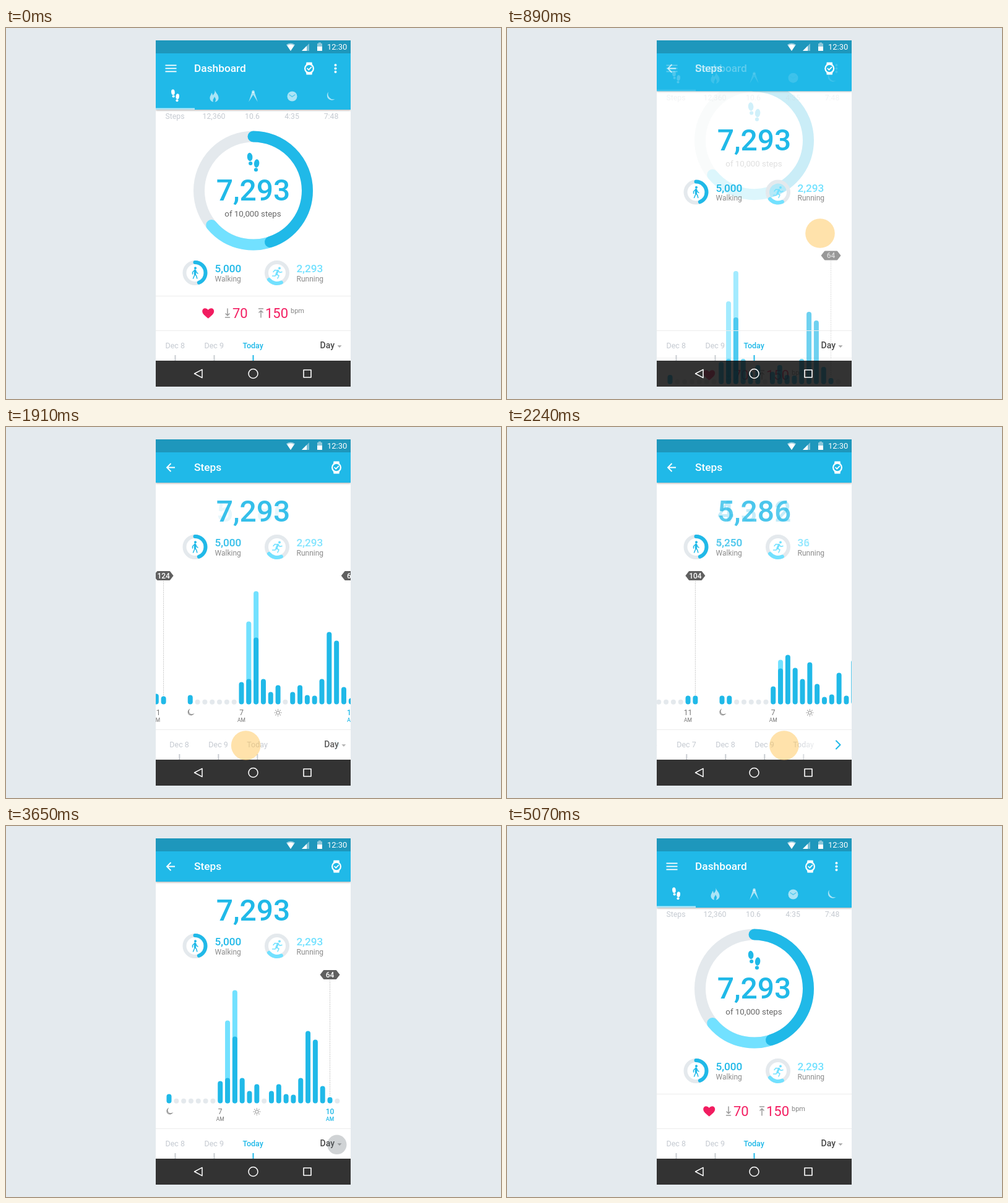
These frames come from a looping animation (800 by 600 pixels, 5600 ms). An HTML page with a canvas:

```html
<!DOCTYPE html>
<html lang="en">
<head>
<meta charset="utf-8">
<title>Step tracker</title>
<style>
html, body { margin: 0; width: 100%; height: 100%; overflow: hidden; background: #e4eaee; }
canvas { display: block; }
</style>
</head>
<body>
<canvas id="stage" width="800" height="600"></canvas>
<script>
const c = document.getElementById('stage').getContext('2d');
const LOOP = 5600, CYAN = '#20b9e8', LIGHT = '#72e1ff', GRAY = '#e4e9ed', PINK = '#f31d61', PALE = '#c5cad1';
const LEFT = 242, WIDTH = 315, MID = 399.5, STEP = 11.82, BASE = 448.5;

// Hourly bar heights; a pair is [walking, total].
const days = [
  { label: 'Today', total: '7,293', walk: '5,000', run: '2,293', last: 22, tag: '64', hour: '10', hourAt: 22,
    bars: [15, 0, 0, 0, 0, 0, 0, 36, [41, 134], [108, 183], 41, 20, 31, 0, 20, 31, 15, 14, 41, 117, 103, 28, 10, 0] },
  { label: 'Dec 9', total: '5,286', walk: '5,250', run: '36', last: 23, tag: '124', hour: '11', hourAt: 22,
    bars: [14, 14, 0, 0, 0, 0, 0, 29, [58, 72], 80, 59, 41, 68, 33, 12, 16, 51, 14, 72, 45, 30, 24, 17, 13] },
  { label: 'Dec 8', total: '4,382', walk: '4,350', run: '32', last: 23, tag: '104', hour: '11', hourAt: 22,
    bars: [14, 0, 0, 0, 0, 0, 0, 24, 52, [66, 78], 43, 28, 36, 60, 31, 14, 47, 20, 0, 0, 0, 0, 14, 14] }
];
const dates = ['Today', 'Dec 9', 'Dec 8', 'Dec 7', 'Dec 6', 'Dec 5', 'Dec 4'];

const clamp = v => Math.max(0, Math.min(1, v));
const seg = (t, a, b) => clamp((t - a) / (b - a));
const mix = (a, b, k) => a + (b - a) * k;

function fade(alpha, draw) {
  if (alpha <= 0) return;
  c.save();
  c.globalAlpha *= Math.min(1, alpha);
  draw();
  c.restore();
}
function at(x, y, scale, draw) {
  c.save();
  c.translate(x, y);
  c.scale(scale, scale);
  draw();
  c.restore();
}
function text(s, x, y, size, color, weight = 400, align = 'left') {
  c.font = `${weight} ${size}px Roboto, sans-serif`;
  c.textAlign = align;
  c.fillStyle = color;
  c.fillText(s, x, y);
}
function rect(x, y, w, h, color) {
  c.fillStyle = color;
  c.fillRect(x, y, w, h);
}
function ellipse(x, y, rx, ry, color, turn = 0) {
  c.beginPath();
  c.ellipse(x, y, rx, ry, turn, 0, 7);
  c.fillStyle = color;
  c.fill();
}
const disc = (x, y, r, color) => ellipse(x, y, r, r, color);
function stroke(d, color, width) {
  c.strokeStyle = color;
  c.lineWidth = width;
  c.stroke(new Path2D(d));
}
function fill(d, color) {
  c.fillStyle = color;
  c.fill(new Path2D(d));
}
// Angles in degrees, clockwise from the top.
function arc(x, y, r, from, to, width, color) {
  c.beginPath();
  c.arc(x, y, r, (from - 90) * Math.PI / 180, (to - 90) * Math.PI / 180);
  c.lineWidth = width;
  c.strokeStyle = color;
  c.stroke();
}

function feet(x, y, scale, color) {
  at(x, y, scale, () => {
    ellipse(-5.4, -8.5, 4.3, 6.8, color, -.1);
    ellipse(-4.3, 1.9, 3.1, 3, color);
    ellipse(5.6, 2, 4.2, 6.8, color, .1);
    ellipse(4.5, 12.2, 3.1, 3, color);
  });
}
function walker() {
  disc(.5, -7.8, 2, CYAN);
  stroke('M0-4L0 2', CYAN, 3.4);
  stroke('M0 2L-3 9M0 2L2.3 5L3.3 9M-1-4L-4-1V2M1-4L2.5-.8L4.5 1', CYAN, 1.5);
}
function runner() {
  disc(4, -7.5, 2, LIGHT);
  stroke('M1.5-3.5L-1 2', LIGHT, 3.2);
  stroke('M-1 2L-3 5H-7.5M-1 2L3 4.5L1 9M1.5-4L-3.5-4.5L-6-1.5M2-3.5L4.5-.5L8-1.5', LIGHT, 1.5);
}
function watch(x) {
  at(x, 65.5, 1, () => {
    fill('M-4.5-10H4.5L5.2-5H-5.2ZM-4.5 10H4.5L5.2 5H-5.2Z', '#fff');
    disc(0, 0, 8, '#fff');
    disc(0, 0, 5.8, CYAN);
    stroke('M-3 0L-.8 2.2L3.4-2.2', '#fff', 1.7);
  });
}
function moon(x, y, scale, draw) {
  at(x, y, scale, () => draw('M-3-7A7 7 0 1 0 7 4A8 8 0 0 1-3-7Z'));
}

function ring(dy, alpha) {
  fade(alpha, () => {
    const y = 263 + dy;
    arc(MID, y, 87.5, 0, 360, 18, GRAY);
    arc(MID, y, 87.5, 150, 230.3, 18, LIGHT);
    arc(MID, y, 87.5, 0, 161.7, 18, CYAN);
    feet(399.5, 217 + dy, 1, CYAN);
    text('of 10,000 steps', 399, 305 + dy, 13.3, '#666', 400, 'center');
  });
}

function summary(numberY, rowY, q) {
  const i = Math.floor(q), f = q - i;
  const show = (day, alpha) => fade(alpha, () => {
    text(day.total, MID, numberY + 17, 48, CYAN, 500, 'center');
    text(day.walk, 337.5, rowY + 6, 17.2, CYAN, 500);
    text(day.run, 469.5, rowY + 6, 17.2, LIGHT, 500);
  });
  show(days[i], 1 - f);
  if (f) show(days[i + 1], f);
  text('Walking', 337.5, rowY + 20.5, 12, '#8b8b8b');
  text('Running', 469.5, rowY + 20.5, 12, '#8b8b8b');
  const y = rowY + 7;
  arc(305.5, y, 17, 0, 360, 6, GRAY);
  arc(305.5, y, 17, 0, 158, 6, CYAN);
  at(305.5, y, 1, walker);
  arc(438, y, 17, 0, 360, 6, GRAY);
  arc(438, y, 17, 156, 230, 6, LIGHT);
  at(438, y, 1, runner);
}

function bar(x, h, color) {
  c.beginPath();
  c.roundRect(x - 4, BASE - h, 8, h, 4);
  c.fillStyle = color;
  c.fill();
}
function hourLabel(s, x, color, weight) {
  text(s, x, 466, 12, color, weight, 'center');
  text('AM', x, 476.5, 8.5, color, weight, 'center');
}
function dayChart(day, shift) {
  const X = i => 263.5 + STEP * i + shift;
  if (X(0) > 570 || X(23) < 220) return;
  const tagX = X(day.last), now = day === days[0];
  c.setLineDash([1.5, 1.5]);
  c.lineCap = 'butt';
  stroke(`M${tagX} 249V436`, '#bbb', 1);
  c.setLineDash([]);
  c.lineCap = 'round';
  day.bars.forEach((v, i) => {
    const [low, high] = Array.isArray(v) ? v : [v, 0];
    if (high) bar(X(i), high, LIGHT);
    if (low) bar(X(i), low, CYAN);
    else disc(X(i), 444.8, 4, GRAY);
  });
  at(tagX, 240.5, 1, () => {
    fill('M-16 0L-11-6.5Q-10.5-7.5-9.5-7.5H9.5Q10.5-7.5 11-6.5L16 0L11 6.5Q10.5 7.5 9.5 7.5H-9.5Q-10.5 7.5-11 6.5Z', '#606060');
    text(day.tag, 0, 4.2, 12, '#fff', 500, 'center');
  });
  moon(X(0), 462, .65, d => stroke(d, '#888', 1.6));
  hourLabel('7', X(7), '#777', 400);
  at(X(12), 462, 1, () => {
    arc(0, 0, 2.7, 0, 360, 1, '#888');
    for (let k = 0; k < 8; k++) {
      c.rotate(Math.PI / 4);
      stroke('M4.7 0H5.5', '#888', 1);
    }
  });
  hourLabel(day.hour, X(day.hourAt), now ? CYAN : '#777', now ? 500 : 400);
}
function chart(p, q) {
  fade(p, () => {
    c.translate(0, 360 * (1 - p));
    days.forEach((day, k) => dayChart(day, WIDTH * (q - k)));
  });
}

function heartRow(p) {
  fade(1 - p * p, () => {
    c.translate(0, 155 * p);
    rect(LEFT, 433, WIDTH, 1, '#ececec');
    at(326.7, 461, 1, () => {
      fill('M0 8.7C-5 4.5-9.5 1.5-9.5-3C-9.5-8.5-3-9.3 0-5C3-9.3 9.5-8.5 9.5-3C9.5 1.5 5 4.5 0 8.7Z', PINK);
      for (let i = -2; i < 3; i++)
        for (let j = -1; j < 2; j++) disc(i * 3, j * 3 - 1, .45, '#c9104c');
    });
    stroke('M358 454V465M355 462L358 465L361 462M354.5 468H361.5', '#999', 1.5);
    stroke('M412 468V457M409 460L412 457L415 460M408.5 454H415.5', '#999', 1.5);
    text('70', 366, 469, 22, PINK);
    text('150', 419, 469, 22, PINK);
    text('bpm', 460, 461, 11, '#888');
  });
}

function dateStrip(q, t) {
  rect(LEFT, 489, WIDTH, 1, '#ececec');
  dates.forEach((s, k) => {
    const x = MID + 63 * (q - k), on = Math.abs(x - MID) < 3;
    text(s, x - .3, 518, 12.5, on ? CYAN : PALE, on ? 500 : 400, 'center');
    rect(x - 1, 529, 2, 9, on ? CYAN : '#c9cdd2');
  });
  fade(q, () => {
    const g = c.createLinearGradient(462, 0, 515, 0);
    g.addColorStop(0, 'rgba(255,255,255,0)');
    g.addColorStop(1, '#fff');
    rect(462, 491, 95, 47, g);
    stroke('M532 507.5L538.5 514L532 520.5', CYAN, 2);
  });
  fade(1 - q, () => {
    const x = 63 * q;
    text('Day', 507.5 + x, 518, 14, '#484848', 500);
    at(539 + x, 515, 1, () => fill('M-3.5-1.8H3.5L0 2Z', '#aaa'));
  });
  fade(seg(t, 3140, 3260) * (1 - seg(t, 3950, 4040)), () =>
    disc(534.8, 515.3, mix(8, 15.7, seg(t, 3140, 3350)), 'rgba(100,108,115,.3)'));
}

function tabs(alpha, dy) {
  fade(alpha, () => {
    c.translate(0, dy);
    feet(273.5, 109.3, .66, '#fff');
    rect(LEFT, 129.5, 63, 2.5, 'rgba(255,255,255,.65)');
    c.globalAlpha *= .62;
    at(336.5, 110, 1, () => {
      fill('M1-10C2-5 7-3 7 3C7 7 4 9.5 1 9.5C4 6 2 4 .5 1C0 4-3 5-1.5 9.5C-5 9-7.5 6-7 2C-6.5-1-4.5-2-4.5-5C-3-4-2.5-2.5-2.5-1C0-3 1.5-6 1-10Z', '#fff');
    });
    at(399.5, 110, 1, () => {
      disc(0, -7, 2.2, '#fff');
      fill('M-1.8-7L-7.3 9.5L0-2L7.3 9.5L1.8-7Z', '#fff');
    });
    disc(462.5, 110.5, 8, '#fff');
    stroke('M458 108L462.5 111L467 108', CYAN, 1.5);
    moon(524.5, 110.5, 1.05, d => fill(d, '#fff'));
  });
}

function header(h, alpha) {
  const bottom = 132 - 42 * h;
  fade(alpha, () => {
    [['Steps', 273], ['12,360', 336], ['10.6', 398], ['4:35', 462], ['7:48', 525.5]].forEach(([s, x]) =>
      text(s, x, 147 - 42 * h, 12.3, PALE, 400, 'center'));
  });
  c.save();
  c.shadowColor = 'rgba(0,0,0,.35)';
  c.shadowBlur = 3;
  c.shadowOffsetY = 1;
  rect(LEFT, 41, WIDTH, bottom - 41, CYAN);
  c.restore();
  tabs(alpha, -42 * h);
  fade(1 - h, () => {
    for (const y of [60.5, 65.5, 70.5]) rect(257.5, y - 1, 18, 1.8, '#fff');
    text('Dashboard', 304, 71.3, 17.3, '#fff', 500);
  });
  fade(1 - 1.2 * h, () => {
    for (const y of [60, 65.5, 71]) disc(532.5, y, 2, '#fff');
  });
  fade(h, () => {
    c.lineCap = 'butt';
    stroke('M273 65.5H260.5M266.5 59L260 65.5L266.5 72', '#fff', 1.8);
    c.lineCap = 'round';
    text('Steps', 304, 71.3, 17.3, '#fff', 500);
  });
  watch(490 + 44 * h);
}

function statusBar() {
  rect(LEFT, 20, WIDTH, 21, '#1e97bc');
  fill('M453 27Q460 22.5 467 27L460 37Z', '#a5d5e4');
  fill('M454.5 28.5Q460 25 465.5 28.5L460 37Z', '#fff');
  fill('M478 37H490V25Z', '#7cc0d6');
  fill('M478 37H486V29Z', '#fff');
  rect(505, 23.5, 4, 2, '#8dc8db');
  rect(503, 25, 8, 6, '#8dc8db');
  rect(503, 30, 8, 7, '#fff');
  text('12:30', 519, 35.3, 13, '#fff');
}
function navBar() {
  rect(LEFT, 538, WIDTH, 42, 'rgba(0,0,0,.8)');
  c.lineJoin = 'round';
  stroke('M304.5 559L317 552.3V565.7Z', '#fff', 1.5);
  arc(MID, 559, 7.5, 0, 360, 1.5, '#fff');
  stroke('M481 553H493V565H481Z', '#fff', 1.6);
  c.lineJoin = 'miter';
}

function finger(t, p, q) {
  let x = 506, y = 462.5 - 202 * p, alpha = 0;
  if (t < 1200) alpha = seg(t, 160, 370) * (1 - seg(t, 1030, 1100));
  else if (t < 2600) {
    const k = seg(t, 1420, 1740), e = k * k * (3 - 2 * k);
    x = mix(506, 382, e) + 52 * q;
    y = mix(260.5, 515, e);
    alpha = seg(t, 1430, 1530) * (1 - seg(t, 2450, 2510));
  } else alpha = seg(t, 3950, 4080) * (1 - seg(t, 4760, 5070));
  fade(alpha, () => disc(x, y, 23.8, 'rgba(255,190,70,.45)'));
}

function draw(t) {
  const p = t < 2500 ? seg(t, 510, 1100) : 1 - seg(t, 4117, 4707);
  const q = t < 2800 ? 2 * seg(t, 1880, 2450) : 2 * (1 - seg(t, 3200, 3650));
  // The bar runs slightly ahead of the content in both directions.
  const h = t < 2500 ? clamp(p * 1.1) : 1 - clamp((1 - p) * 1.14);
  const alpha = 1 - p * 1.22;

  rect(0, 0, 800, 600, '#e4eaee');
  c.save();
  c.beginPath();
  c.rect(LEFT, 20, WIDTH, 560);
  c.clip();
  c.lineCap = 'round';
  rect(LEFT, 20, WIDTH, 560, '#fff');
  ring(-126 * p, alpha);
  heartRow(p);
  chart(p, q);
  summary(262 - 126 * p, 389 - 202 * p, q);
  dateStrip(q, t);
  header(h, alpha);
  statusBar();
  navBar();
  finger(t, p, q);
  c.restore();
}

function loop() {
  draw(performance.now() % LOOP);
  requestAnimationFrame(loop);
}
loop();
</script>
</body>
</html>
```
